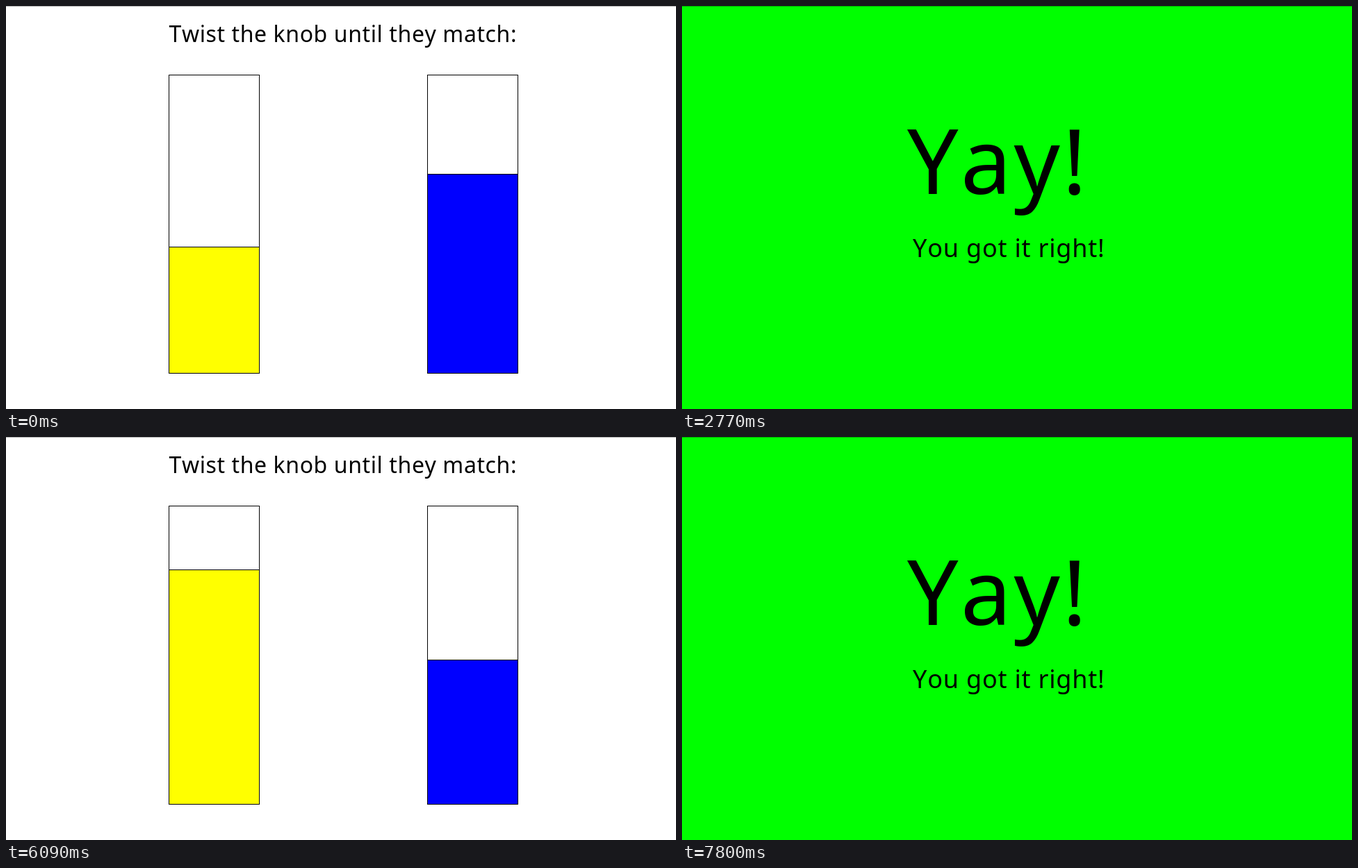
Animation of 964x581 px, one loop 8000 ms. Source, as an HTML page with a canvas:

```html
<!DOCTYPE html>
<html lang="en">
<head>
<meta charset="utf-8">
<title>Twist the knob</title>
<style>
  html, body { margin: 0; width: 100%; height: 100%; overflow: hidden; background: #fff; }
  canvas { display: block; }
</style>
</head>
<body>
<canvas id="stage" width="964" height="581"></canvas>
<script>
const W = 964, H = 581, LOOP = 8000, TICK = 80;
const WIN = 2770, NEXT = 4840, WIN_AGAIN = 7800;
const ctx = document.getElementById('stage').getContext('2d');

// Turns of the knob: [ms, y of the blue level]
const turnDown = [[0, 242], [100, 239], [1400, 239], [1570, 237], [2120, 305], [2560, 336]];
const turnUp = [
  [5200, 349], [5400, 343], [5500, 348], [5680, 347], [6080, 321],
  [6560, 273], [6700, 273], [7270, 219], [7680, 200]
];

// The knob is read once per tick and glides between its turning points.
function levelAt(path, t) {
  const now = Math.floor(t / TICK) * TICK;
  const next = path.findIndex(([ms]) => ms > now);
  if (next === 0) return path[0][1];
  if (next < 0) return path[path.length - 1][1];
  const [t0, y0] = path[next - 1], [t1, y1] = path[next];
  return Math.round(y0 + (y1 - y0) * (now - t0) / (t1 - t0));
}

function rect(color, x, y, w, h) {
  ctx.fillStyle = color;
  ctx.fillRect(x, y, w, h);
}

function label(text, x, y, size, spacing) {
  ctx.font = `${size}px "Noto Sans", "Open Sans", sans-serif`;
  ctx.fontKerning = 'none';
  ctx.letterSpacing = spacing + 'px';
  ctx.fillStyle = '#000';
  ctx.fillText(text, x, y);
}

function bar(x, level, color) {
  const top = 99, bottom = 529, width = 130;
  rect(color, x, level, width, bottom - level);
  ctx.strokeStyle = '#000';
  ctx.lineWidth = 1;
  ctx.strokeRect(x + 0.5, top + 0.5, width, bottom - top);
  rect('#000', x, level, width, 1);
}

function drawGame(yellow, blue) {
  label('Twist the knob until they match:', 234.5, 52, 32, 0.6);
  bar(234, yellow, '#ff0');
  bar(606, blue, '#00f');
}

function drawWin() {
  rect('#0f0', 0, 0, W, H);
  label('Yay!', 324, 271, 130, 3.5);
  label('You got it right!', 332, 362, 36, 0.8);
}

function draw(t) {
  rect('#fff', 0, 0, W, H);
  if (t < WIN) drawGame(347, levelAt(turnDown, t));
  else if (t >= NEXT && t < WIN_AGAIN) drawGame(191, levelAt(turnUp, t));
  else drawWin();
  rect('rgba(0,0,0,0.28)', 0, 0, W, 1);
}

const begin = performance.now();
function tick() {
  draw((performance.now() - begin) % LOOP);
  requestAnimationFrame(tick);
}
tick();
</script>
</body>
</html>
```
